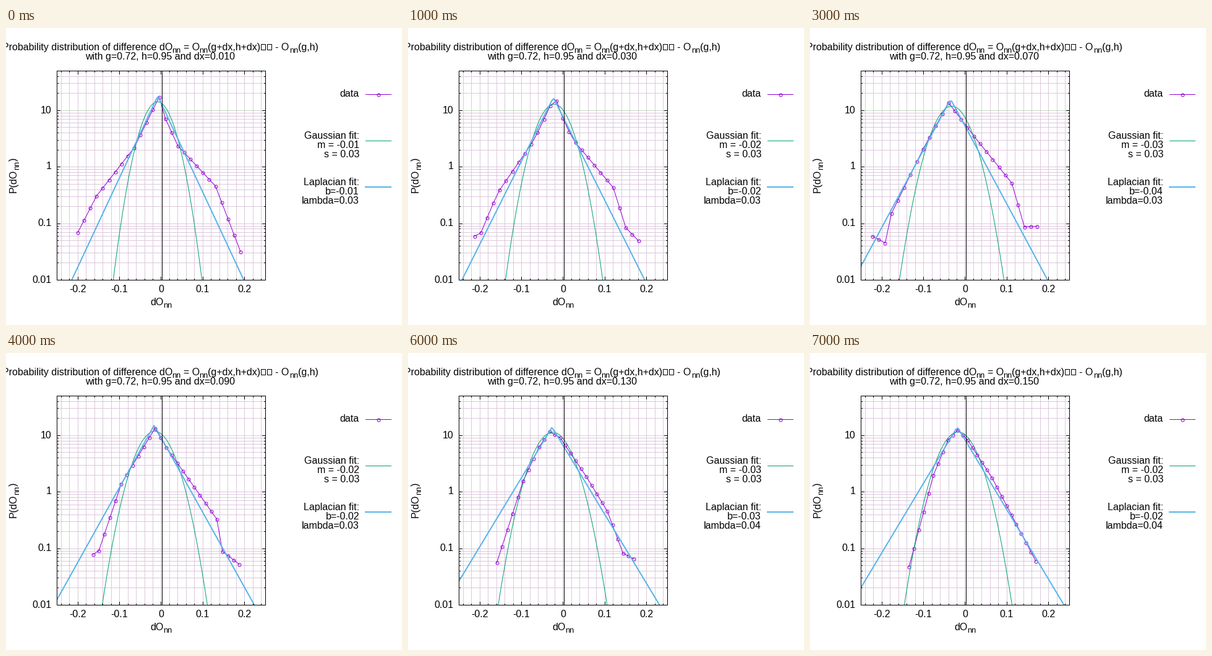
Write a matplotlib script that moves like this. It is 640 px wide and 480 px high and loops after 8000 ms.

```python
import numpy as np
import matplotlib.pyplot as plt
from matplotlib.animation import FuncAnimation
from matplotlib.patches import Rectangle

DPI = 100
PX = 72 / DPI  # points per pixel
plt.rcParams.update({"font.family": "Liberation Sans",
                     "font.size": 16 * PX})

LEFT, RIGHT, TOP, BOTTOM = 82, 419, 69, 407
DECADE = (BOTTOM - TOP) / np.log10(50 / 0.01)
PURPLE, GREEN, BLUE = "#9400d3", "#009e73", "#56b4e9"
GRID, GRID_TEN = "#dcc8dc", "#c4dac4"
POINTS = 27


def px(x):
    return LEFT + (x + 0.25) / 0.5 * (RIGHT - LEFT)


def py(p):
    return BOTTOM - DECADE * (np.log10(p) + 2)


def state(fit, first, last, *knots):
    """Fit (m, s, b, lambda) and evenly spaced points through a few knots."""
    steps, heights = zip(*knots)
    return (fit, np.linspace(first, last, POINTS),
            np.interp(np.arange(POINTS), steps, heights))


def between(a, b, fit, shift):
    """A state halfway between two others, moved sideways."""
    return fit, (a[1] + b[1]) / 2 + shift, (a[2] + b[2]) / 2


s010 = state((-.0089, .0279, -.0085, .0275), 115.5, 378.5,
             (0, 330), (3, 271), (9, 193), (13, 111),
             (14, 146), (16, 190), (22, 255), (26, 361))
s050 = state((-.0074, .0312, -.0085, .0297), 118.5, 385.5,
             (0, 342), (1, 351), (4, 264), (10, 165), (12, 119),
             (13, 123), (15, 166), (22, 260), (24, 337), (26, 326))
s070 = state((-.0326, .0333, -.0352, .0316), 100.5, 366.5,
             (0, 336), (2, 347), (3, 299), (8, 195), (12, 120),
             (16, 174), (22, 250), (24, 321), (26, 320))
s090 = state((-.0156, .0335, -.0171, .0328), 140.5, 376.5,
             (0, 325), (1, 319), (5, 211), (11, 121),
             (13, 152), (22, 268), (23, 320), (26, 341))
s110 = state((-.0282, .0359, -.0289, .0361), 130.5, 367.5,
             (0, 332), (5, 216), (10, 129), (12, 132),
             (21, 249), (24, 340), (26, 328))
s150 = state((-.0171, .0344, -.0193, .0353), 159.5, 364.5,
             (0, 345), (5, 197), (8, 140), (10, 124),
             (12, 140), (17, 201), (26, 336))
s030 = between(s010, s050, (-.022, .0308, -.024, .0295), -10)
s130 = between(s110, s150, (-.0255, .0348, -.027, .0356), -2)
states = [s010, s030, s050, s070, s090, s110, s130, s150]

fig = plt.figure(figsize=(640 / DPI, 480 / DPI), dpi=DPI, facecolor="white")
ax = fig.add_axes([0, 0, 1, 1])
ax.set_xlim(0, 640)
ax.set_ylim(480, 0)
ax.axis("off")


def line(xs, ys, color, width=1, **kw):
    return ax.plot(xs, ys, color=color, lw=width * PX, **kw)[0]


def text(x, y, s, ha="left", size=16, **kw):
    return ax.text(x, y, s, ha=ha, va="baseline", fontsize=size * PX,
                   color="black", zorder=6, rotation_mode="anchor", **kw)


def sub(x, y, **kw):
    text(x, y, "nn", size=12.8, **kw)


def x_tick(x, size):
    line([x, x], [BOTTOM, BOTTOM - size], "black", zorder=4)
    line([x, x], [TOP, TOP + size], "black", zorder=4)


def y_tick(y, size):
    line([LEFT, LEFT + size], [y, y], "black", zorder=4)
    line([RIGHT, RIGHT - size], [y, y], "black", zorder=4)


# grid and ticks
for k in range(-12, 13):
    x = round(px(k * 0.02))
    line([x, x], [TOP, BOTTOM], GRID, zorder=1)
    x_tick(x, 5 if k % 5 == 0 else 2)
for e in range(-2, 2):
    for d in range(1, 10):
        p = d * 10.0 ** e
        if 0.01 < p < 50:
            y = round(py(p))
            ten = d == 1 and e == 1
            line([LEFT, RIGHT], [y, y], GRID_TEN if ten else GRID,
                 zorder=1.5 if ten else 1)
            y_tick(y, 5 if d == 1 else 2)

line([LEFT, RIGHT, RIGHT, LEFT, LEFT], [TOP, TOP, BOTTOM, BOTTOM, TOP],
     "black", zorder=5)
line([252, 252], [TOP, BOTTOM], "black", zorder=4)

for v in ("-0.2", "-0.1", "0", "0.1", "0.2"):
    text(px(float(v)), 427, v, "center")
for v in ("0.01", "0.1", "1", "10"):
    text(73.5, round(py(float(v))) + 4.5, v, "right")

# axis labels
text(233, 448, "dO")
sub(254, 452)
text(17, 266, "P(dO", rotation=90)
sub(21, 229, rotation=90)
text(17, 215, ")", rotation=90)

# title
text(-6, 36, "Probability distribution of difference dO")
sub(268, 40)
text(287, 36, "= O")
sub(312, 40)
text(326, 36, "(g+dx,h+dx)")
for x in (412, 422):
    ax.add_patch(Rectangle((x, 26), 7, 9, fill=False, lw=PX, ec="black"))
text(435, 36, "- O")
sub(458, 40)
text(472, 36, "(g,h)")
subtitle = text(249.5, 51, "", "center")

# key
MARK = dict(marker="o", ms=5 * PX, mfc="none", mew=PX)
KEY_RIGHT = 571
for y, label in ((111, "data"), (179, "Gaussian fit:"),
                 (254, "Laplacian fit:")):
    text(KEY_RIGHT, y, label, "right")
line([581, 622], [107, 107], PURPLE)
line([601.5], [107.5], PURPLE, **MARK)
line([581, 622], [182, 182], GREEN)
line([581, 622], [257, 257], BLUE, 2)
key_m, key_s, key_b, key_lam = (
    text(KEY_RIGHT, y, "", "right") for y in (194, 209, 269, 284))

# moving curves
clip = Rectangle((LEFT, TOP), RIGHT - LEFT + 1, BOTTOM - TOP + 1,
                 transform=ax.transData)
data = line([], [], PURPLE, zorder=2, **MARK)
gauss = line([], [], GREEN, zorder=2.5)
laplace = line([], [], BLUE, 2, zorder=3)
for curve in (data, gauss, laplace):
    curve.set_clip_path(clip)
    curve.set_snap(False)

grid_x = np.linspace(-0.25, 0.25, 100)


def set_curve(curve, p):
    curve.set_data(px(grid_x) + 0.5, py(p) + 0.5)


def draw(i):
    (m, s, b, lam), xs, ys = states[i]
    subtitle.set_text(f"with g=0.72, h=0.95 and dx={0.01 + 0.02 * i:.3f}")
    data.set_data(xs + 0.5, ys + 0.5)
    set_curve(gauss, np.exp(-((grid_x - m) / s) ** 2 / 2)
              / (s * np.sqrt(2 * np.pi)))
    set_curve(laplace, np.exp(-np.abs(grid_x - b) / lam) / (2 * lam))
    key_m.set_text(f"m = {m:.2f}")
    key_s.set_text(f"s = {s:.2f}")
    key_b.set_text(f"b={b:.2f}")
    key_lam.set_text(f"lambda={lam:.2f}")
    return subtitle, data, gauss, laplace, key_m, key_s, key_b, key_lam


anim = FuncAnimation(fig, draw, frames=len(states), interval=1000,
                     init_func=lambda: draw(0), repeat=True, repeat_delay=0)
plt.show()
```
